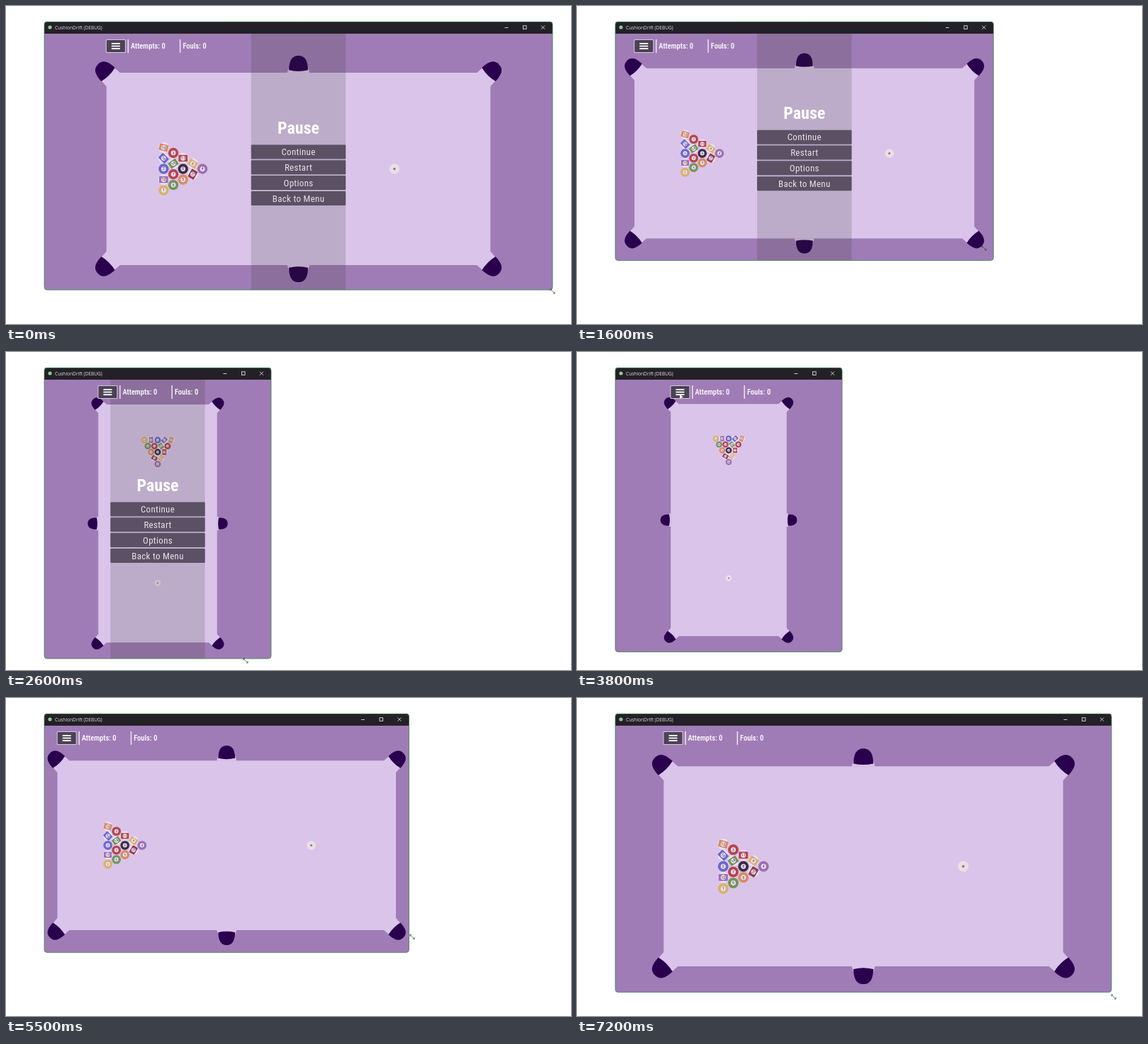
Recreate the animation shown at these times as an HTML page with a canvas. Size 797x448 px, loop 7.3 s.

```html
<!DOCTYPE html>
<html>
<head>
<meta charset="utf-8">
<style>
html, body { margin: 0; width: 100%; height: 100%; overflow: hidden; background: #fff; }
canvas { display: block; }
</style>
</head>
<body>
<canvas id="stage" width="797" height="448"></canvas>
<script>
const ctx = document.getElementById('stage').getContext('2d');
const LOOP = 7300, STEP = 100, LEFT = 54, TOP = 22, BAR = 39;
const CONDENSED = '"Roboto Condensed", Roboto, sans-serif';
const FELT = '#dac4ea', RAIL = '#a07cb6', POCKET = '#2a004e';

// time, window right, window bottom, cursor x, cursor y
const KEYS = [
  [0, 771, 400, 771, 402],
  [800, 757, 374, 760, 377],
  [1600, 587.5, 358.5, 574, 341],
  [1900, 450, 358.5, 440, 352],
  [2150, 374, 380, 362, 384],
  [2400, 374, 419, 346, 421],
  [2600, 374, 432, 338, 435],
  [2900, 374, 441, 340, 443],
  [3200, 374, 440, 345, 442],
  [3400, 374, 422.5, 330, 380],
  [3700, 374, 422.5, 146, 60],
  [3900, 374, 422.5, 146, 60],
  [4500, 374, 422.5, 380, 428],
  [4800, 376, 408, 380, 411],
  [5000, 411, 358.5, 418, 344],
  [5600, 600, 358.5, 604, 335],
  [6100, 688, 358.5, 695, 314],
  [6400, 720, 358.5, 724, 355],
  [7200, 754, 414.5, 757, 421]
];

const YELLOW = '#d9b269', BLUE = '#6a68cf', RED = '#b8434f', PURPLE = '#9c70b4',
      ORANGE = '#d98c62', GREEN = '#6f9658', MAROON = '#963a50', BLACK = '#3a2c48';
// columns from the wide end to the apex: number, colour, stripe angle
const RACK = [
  [[13, ORANGE, 15], [10, BLUE, 45], [2, BLUE], [12, PURPLE, 0], [1, YELLOW]],
  [[3, RED], [14, GREEN, -35], [7, RED], [6, GREEN]],
  [[11, RED, 0], [8, BLACK], [5, ORANGE]],
  [[9, YELLOW, 35], [15, MAROON, -60]],
  [[4, PURPLE]]
];

function sample(t) {
  const i = Math.max(1, KEYS.findIndex(k => k[0] >= t));
  const a = KEYS[i - 1], b = KEYS[i], p = (t - a[0]) / (b[0] - a[0]);
  return a.map((v, n) => v + (b[n] - v) * p);
}

function rect(x, y, w, h, fill, r = 0) {
  ctx.fillStyle = fill;
  ctx.beginPath();
  ctx.roundRect(x, y, w, h, r);
  ctx.fill();
}

function disc(x, y, r, fill) {
  ctx.fillStyle = fill;
  ctx.beginPath();
  ctx.arc(x, y, r, 0, 7);
  ctx.fill();
}

function polygon(points, fill) {
  ctx.fillStyle = fill;
  ctx.beginPath();
  points.forEach(([x, y]) => ctx.lineTo(x, y));
  ctx.fill();
}

function lines(list, color, width) {
  ctx.strokeStyle = color;
  ctx.lineWidth = width;
  ctx.beginPath();
  for (const [x1, y1, x2, y2] of list) { ctx.moveTo(x1, y1); ctx.lineTo(x2, y2); }
  ctx.stroke();
}

function text(str, x, y, font, fill, align = 'left') {
  ctx.font = font;
  ctx.fillStyle = fill;
  ctx.textAlign = align;
  ctx.fillText(str, x, y);
}

function at(x, y, degrees, draw) {
  ctx.save();
  ctx.translate(x, y);
  ctx.rotate(degrees * Math.PI / 180);
  draw();
  ctx.restore();
}

function pocket(x, y, angle) {
  const corner = x !== 0;
  at(x, y, angle, () => {
    ctx.translate(0, corner ? 1.25 : -1.4);
    polygon(corner ? [[-5, 3.75], [-4.75, -.5], [4.75, -.5], [5, 3.75]]
                   : [[-5.85, 1.5], [-5, -1.4], [5, -1.4], [5.85, 1.5]], FELT);
    ctx.fillStyle = POCKET;
    ctx.beginPath();
    ctx.moveTo(-5, 0);
    ctx.bezierCurveTo(-4.8, -4, -4, -7.5, 0, -7.5);
    ctx.bezierCurveTo(4, -7.5, 4.8, -4, 5, 0);
    ctx.quadraticCurveTo(0, 1.2, -5, 0);
    ctx.fill();
  });
}

function ball(x, y, [number, color, stripe]) {
  at(x, y, stripe || 0, () => {
    if (stripe === undefined) disc(0, 0, 2.65, color);
    else {
      disc(0, 0, 2.75, '#eee2f0');
      rect(-2.35, -1.75, 4.7, 3.5, color, .5);
    }
    disc(0, 0, 1.25, '#ecdfee');
    text(number, 0, .65, '1.8px Roboto, sans-serif', '#33243f', 'center');
  });
}

function table(cx, cy, size, portrait) {
  at(cx, cy, portrait ? 90 : 0, () => {
    ctx.scale(size / 100, size / 100);
    rect(-100, -50, 200, 100, FELT);
    for (const side of [0, 180]) {
      at(0, 0, side, () => [-1, 0, 1].forEach(k => pocket(k * 100, -50, k * 45)));
    }
    RACK.forEach((column, c) => column.forEach((b, r) =>
      ball(-50 - (4 - c) * 5.05, (r - (column.length - 1) / 2) * 5.55, b)));
    disc(50, 0, 2.65, '#ebdfe6');
    disc(50, 0, .65, '#8a7a88');
  });
}

function hud(x) {
  rect(x, 47, 28, 19, '#d6c6df', 1.5);
  rect(x + 1, 48, 26, 17, '#4b4254', 1);
  for (const y of [52, 55.6, 59.2]) rect(x + 8, y, 12, 1.8, '#fff');
  for (const dx of [30.7, 104]) rect(x + dx, 47, 1.5, 19, '#eee4f3');
  const font = '500 10.5px ' + CONDENSED;
  [['Attempts:', 35], ['0', 78.5], ['Fouls:', 108.5], ['0', 136.5]]
    .forEach(([s, dx]) => text(s, x + dx, 59.8, font, '#fff'));
}

function pauseMenu(cx, cy) {
  text('Pause', cx, cy - 39.5, 'bold 24px ' + CONDENSED, '#fff', 'center');
  ['Continue', 'Restart', 'Options', 'Back to Menu'].forEach((label, i) => {
    const y = cy - 14 + i * 21.8;
    rect(cx - 66.7, y - 10, 133.4, 20, '#5c5064', 1);
    ctx.letterSpacing = '0.3px';
    text(label, cx, y + 4.6, '13px ' + CONDENSED, '#e8e0ec', 'center');
    ctx.letterSpacing = '0px';
  });
}

function titleBar(right) {
  rect(LEFT, TOP, right - LEFT, BAR - TOP, '#242027', [4, 4, 0, 0]);
  disc(62, 30, 2.6, '#8cc79a');
  text('CushionDrift (DEBUG)', 69, 32.7, '6.6px "Open Sans", sans-serif', '#e2e0e4');
  lines([[right - 67.5, 30.5, right - 62.5, 30.5],
         [right - 16, 27.7, right - 11, 32.7], [right - 16, 32.7, right - 11, 27.7]], '#ddd', .9);
  ctx.strokeRect(right - 41.5, 27.8, 4.6, 4.6);
}

function cursor(x, y, arrow) {
  at(x, y, 0, () => {
    if (arrow) {
      polygon([[-1, -1], [-1, 6], [1, 4.5], [4, 4]], '#fff');
    } else {
      lines([[-3, -3, 3, 3], [-3.5, -3, -1, -3], [-3, -3, -3, -.5],
             [3.5, 3, 1, 3], [3, 3, 3, .5]], '#234a2a', .7);
    }
  });
}

function render(t) {
  const [, right, bottom, mx, my] = sample(t);
  const w = right - LEFT, h = bottom - BAR, cx = LEFT + w / 2, cy = BAR + h / 2;
  const portrait = w < h, paused = t < 3700;
  const size = portrait ? Math.min(h / 2.345, w / 1.15) : Math.min(h / 1.333, w / 2.155);

  rect(0, 0, 797, 448, '#fff');
  rect(LEFT, TOP, w, bottom - TOP, RAIL, 4);
  table(cx, cy + size * .037, size, portrait);
  if (paused) {
    rect(cx - 66.7, BAR, 133.4, h, 'rgba(38,44,28,.16)');
    pauseMenu(cx, cy);
  }
  hud(cx - size * (portrait ? .5 : 1) - .8);
  titleBar(right);
  ctx.strokeStyle = '#3f8650';
  ctx.lineWidth = .8;
  ctx.beginPath();
  ctx.roundRect(LEFT, TOP + .4, w, bottom - TOP - .4, 4);
  ctx.stroke();
  cursor(mx, my, t >= 3400 && t < 4500);
}

function tick() {
  render(Math.floor(performance.now() % LOOP / STEP) * STEP);
  requestAnimationFrame(tick);
}
tick();
</script>
</body>
</html>
```
